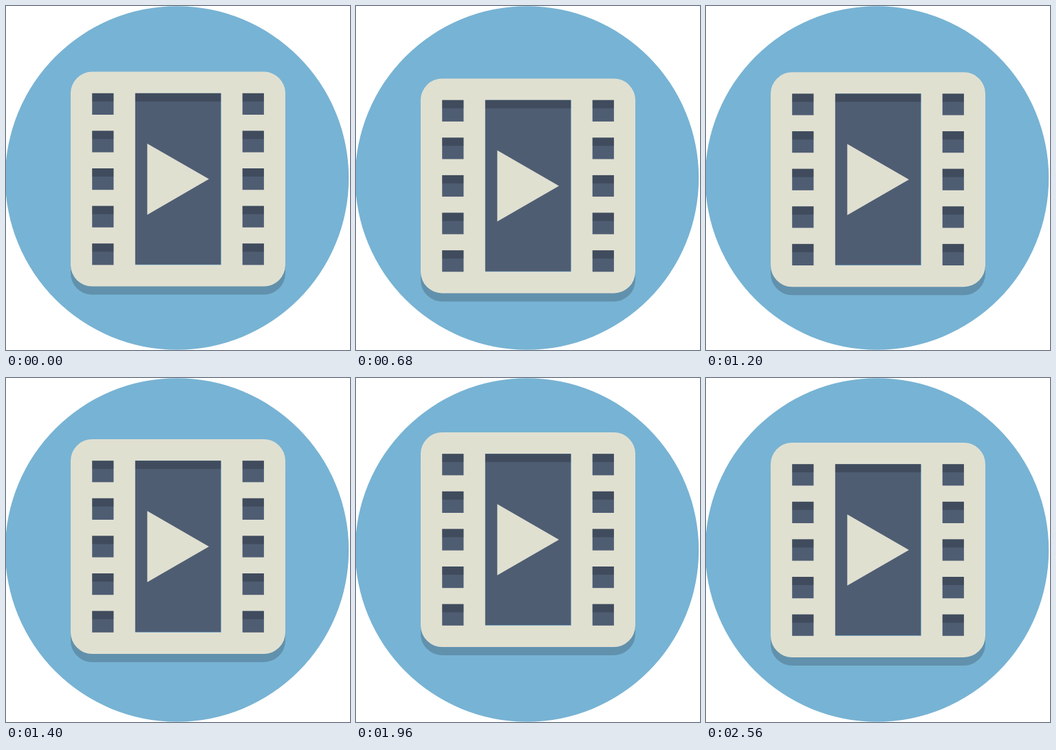
An HTML page that plays this animation: 500x500 px, repeating every 2600 ms.

```html
<!DOCTYPE html>
<html lang="en">
<head>
<meta charset="utf-8">
<title>Floating film icon</title>
<style>
  html, body { margin: 0; width: 100%; height: 100%; overflow: hidden; background: #fff; }
  svg { display: block; width: 100%; height: 100%; }
</style>
</head>
<body>
<svg viewBox="0 0 500 500">
  <defs>
    <g id="hole">
      <rect width="31.2" height="31.2" fill="#4f5d73"/>
      <rect width="31.2" height="12" fill-opacity=".19"/>
    </g>
    <g id="holes">
      <use href="#hole"/>
      <use href="#hole" y="54.6"/>
      <use href="#hole" y="109.2"/>
      <use href="#hole" y="163.8"/>
      <use href="#hole" y="218.4"/>
    </g>
  </defs>
  <circle cx="248.5" cy="250" r="249.7" fill="#77b3d4"/>
  <g id="film">
    <rect x="94" y="12" width="312" height="312" rx="31.2" fill-opacity=".19"/>
    <rect x="94" width="312" height="312" rx="31.2" fill="#e0e0d1"/>
    <use href="#holes" x="125.2" y="31.2"/>
    <use href="#holes" x="343.7" y="31.2"/>
    <rect x="188" y="31.2" width="124.8" height="249.6" fill="#77b3d4"/>
    <rect x="187.8" y="31.2" width="124.4" height="249" fill="#4f5d73"/>
    <rect x="187.8" y="31.2" width="124.6" height="12" fill-opacity=".19"/>
    <path d="M205.3 104.3V207.8L295 156Z" fill="#e0e0d1"/>
  </g>
</svg>
<script>
  const LOOP = 2600, STEP = 40;
  // time in ms, top edge in px, speed in px per ms
  const keys = [
    [0, 95.6, .024], [560, 102.9, .022], [680, 105.5, .0125], [780, 106.1, 0],
    [1000, 102.8, -.028], [1400, 89, -.035], [1640, 81, -.025], [1860, 78.2, 0],
    [2200, 84.7, .027], [2560, 94, .03], [LOOP, 95.6, .03]
  ];
  const film = document.getElementById('film');

  // Cubic Hermite curve through the keys
  function topAt(t) {
    const i = keys.findIndex(key => key[0] > t);
    const [t0, y0, v0] = keys[i - 1], [t1, y1, v1] = keys[i];
    const span = t1 - t0, u = (t - t0) / span, w = 1 - u;
    return y0 * w * w * (1 + 2 * u) + y1 * u * u * (3 - 2 * u)
      + span * u * w * (v0 * w - v1 * u);
  }

  function draw() {
    const t = Math.floor(performance.now() % LOOP / STEP) * STEP;
    film.setAttribute('transform', `translate(0 ${topAt(t).toFixed(2)})`);
    requestAnimationFrame(draw);
  }
  draw();
</script>
</body>
</html>
```
